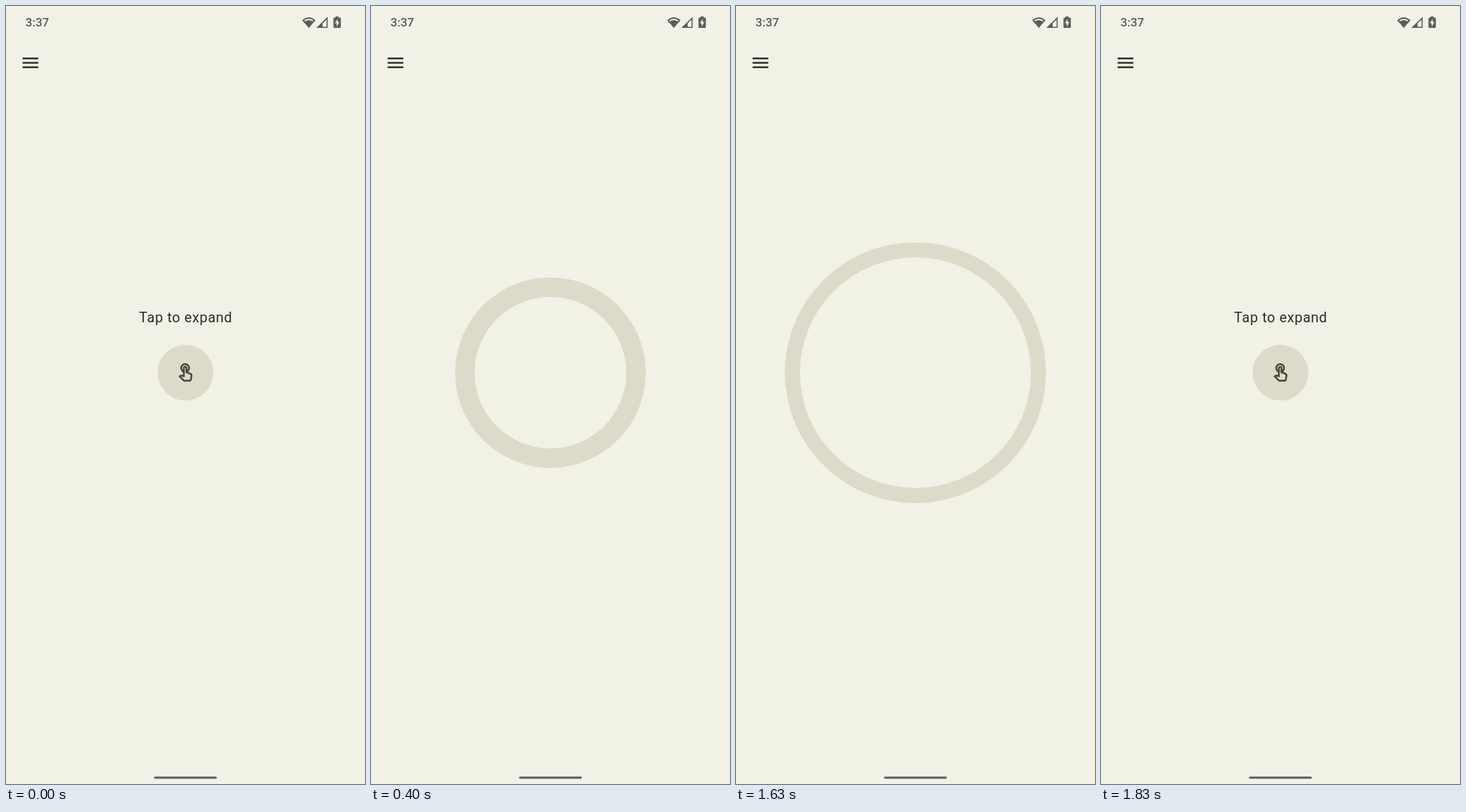
Animation of 508x1102 px, one loop 2.93 s. Source, as an HTML page:

```html
<!DOCTYPE html>
<html lang="en">
<head>
<meta charset="utf-8">
<title>Expanding ring</title>
<style>
  html, body { margin: 0; width: 100%; height: 100%; overflow: hidden; background: #f2f1e5; }
  svg { display: block; width: 508px; height: 1102px; }
  text { font-family: Roboto, sans-serif; }
  .label { font-size: 19.77px; letter-spacing: .62px; text-anchor: middle; fill: #2c2d25; }
  .status { fill: #5c5d57; }
  .clock { font-size: 17px; font-weight: 500; }
</style>
</head>
<body>
<svg viewBox="0 0 508 1102">
  <g class="status">
    <text class="clock" x="27.5" y="29">3:37</text>
    <!-- wifi -->
    <path d="M420.2 20.6Q428.5 13.4 436.8 20.6" fill="none" stroke="#5c5d57" stroke-width="2.1"/>
    <path d="M419.2 20.2L421.2 19.6L424 23L422.6 24.4ZM437.8 20.2L435.8 19.6L433 23L434.4 24.4Z"/>
    <path d="M421.6 22.8Q428.5 17 435.4 22.8L428.5 31.2Z"/>
    <!-- signal -->
    <path fill-rule="evenodd" d="M439.6 31V30.6L455.2 15.2V31ZM448 29.4H453.6V19.2L448 24.8Z"/>
    <!-- battery -->
    <path d="M466.3 14.8H470.7V16.4H472.6Q473.8 16.4 473.8 17.6V29.8Q473.8 31 472.6 31H464.6Q463.4 31 463.4 29.8V17.6Q463.4 16.4 464.6 16.4H466.3Z"/>
    <path fill="#f2f1e5" d="M469.4 18.2L465.4 24.6H467.9V29.2L471.8 22.8H469.4Z"/>
    <rect x="209.4" y="1091.6" width="89" height="3" rx="1.5"/>
  </g>

  <path fill="#2f3027" transform="translate(19.8 65.7) scale(1.2355)" d="M3 6h18v2H3zM3 11h18v2H3zM3 16h18v2H3z"/>

  <g transform="translate(253.9 519.4)">
    <circle id="outer" fill="#dddaca"/>
    <circle id="inner" fill="#f2f1e5"/>
  </g>

  <g id="closed">
    <text class="label" x="254.3" y="448">Tap to expand</text>
    <path fill="#45463a" transform="translate(239.2 504.7) scale(1.2355)" d="M18.19 12.44l-3.24-1.62c1.29-1 2.12-2.56 2.12-4.32 0-3.03-2.47-5.5-5.5-5.5s-5.5 2.47-5.5 5.5c0 2.13 1.22 3.98 3 4.89v3.26c-2.15-.46-2.02-.44-2.26-.44-.53 0-1.03.21-1.41.59L4 16.22l5.09 5.09c.43.44 1.03.69 1.65.69h6.3c.98 0 1.81-.7 1.97-1.67l.8-4.71c.22-1.3-.43-2.58-1.62-3.18zm-.35 2.85l-.8 4.71h-6.3c-.09 0-.17-.04-.24-.1l-3.68-3.68 4.25.89V6.5c0-.28.22-.5.5-.5s.5.22.5.5v6h1.76l3.46 1.73c.4.2.62.63.55 1.06zM8.07 6.5c0-1.93 1.57-3.5 3.5-3.5s3.5 1.57 3.5 3.5c0 .95-.38 1.81-1 2.44V6.5c0-1.38-1.12-2.5-2.5-2.5s-2.5 1.12-2.5 2.5v2.44c-.62-.63-1-1.49-1-2.44z"/>
  </g>

  <g id="open">
    <text class="label" x="254.3" y="487.7">Tap to minimize</text>
    <circle cx="254" cy="519.5" r="9.9" fill="#dbea75"/>
  </g>
</svg>
<script>
  const LOOP = 2930, EXPAND = 230, COLLAPSE = 1630;
  const [outer, inner, closed, open] =
    ['outer', 'inner', 'closed', 'open'].map(id => document.getElementById(id));

  // 30 steps per second, aligned to a 10 ms grid
  const stepsSince = (t, start) => Math.floor(Math.floor((t - start) / 10) * 0.3 + 1e-6);

  // 0 = closed, 1 = open; linear, 400 ms to expand and 200 ms to collapse
  function progress(t) {
    if (t < EXPAND) return 0;
    if (t < COLLAPSE) return Math.min(1, 0.187 + stepsSince(t, EXPAND) / 12);
    return Math.max(0, 0.919 - stepsSince(t, COLLAPSE) / 6);
  }

  const show = (el, on) => { el.style.visibility = on ? 'visible' : 'hidden'; };

  function draw(t) {
    const p = progress(t);
    outer.setAttribute('r', 39.5 + 158 * p);
    inner.setAttribute('r', 177.75 * p);
    show(closed, p === 0);
    show(open, p === 1);
  }

  const begin = performance.now();
  function tick() {
    draw((performance.now() - begin) % LOOP);
    requestAnimationFrame(tick);
  }
  tick();
</script>
</body>
</html>
```
